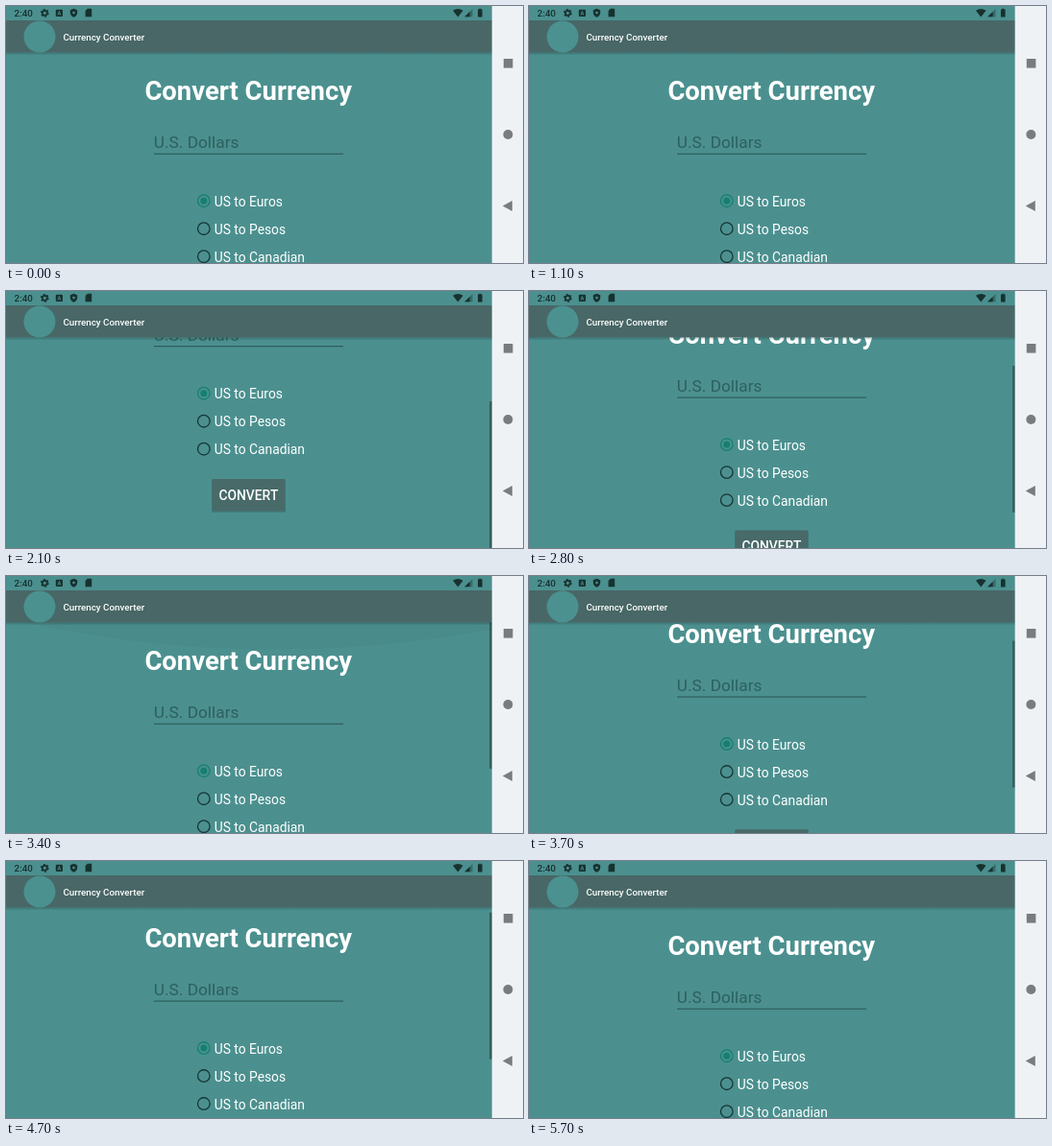
An HTML page for the animation above (5.9 s loop, 538 by 268 pixels).

```html
<!DOCTYPE html>
<html lang="en">
<head>
<meta charset="utf-8">
<title>Currency Converter</title>
<style>
  html, body { margin: 0; width: 100%; height: 100%; overflow: hidden; background: #4b908f; }
  svg { display: block; width: 538px; height: 268px; }
  text { font-family: Roboto, "Liberation Sans", sans-serif; fill: #fff; }
  .ink { fill: #17312f; }
  .heading { font-size: 27.45px; font-weight: 700; }
  .option { font-size: 13.8px; }
  .hint { font-size: 17.3px; fill: #2d605f; }
  .button { font-size: 13.8px; font-weight: 500; text-anchor: middle; }
  .bar { font-size: 9.8px; font-weight: 500; }
  .ring { fill: none; stroke: #183636; stroke-width: 1.3; }
  .on .ring { stroke: #14806f; }
  .dot { fill: #14806f; }
  .glow { fill: #405f60; opacity: .1; }
  .nav { fill: #787c7f; }
</style>
</head>
<body>
<svg viewBox="0 0 538 268" xmlns="http://www.w3.org/2000/svg">
  <defs>
    <clipPath id="view"><rect y="48" width="506" height="220"/></clipPath>
    <linearGradient id="shade" x2="0" y2="1">
      <stop stop-color="#000" stop-opacity=".2"/>
      <stop offset="1" stop-color="#000" stop-opacity="0"/>
    </linearGradient>
  </defs>
  <rect width="506" height="268" fill="#4b908f"/>

  <g clip-path="url(#view)">
    <g id="page">
      <text class="heading" x="144.4" y="98.3">Convert Currency</text>
      <text class="hint" x="153.8" y="148.2">U.S. Dollars</text>
      <rect x="154" y="153.7" width="197" height="1" fill="#285352"/>
      <g id="options"></g>
      <rect x="214" y="293" width="77" height="34.5" rx="1.5" fill="#000" opacity=".13"/>
      <rect x="214.5" y="292.5" width="76" height="33.5" rx="1" fill="#486a69"/>
      <text class="button" x="252.4" y="314.5">CONVERT</text>
    </g>
    <circle id="topGlow" class="glow" cx="280" r="1210"/>
    <circle id="endGlow" class="glow" cx="290" r="1210"/>
    <rect id="thumb" x="503" width="3" height="153" fill="#000"/>
  </g>

  <rect y="48.5" width="506" height="3" fill="url(#shade)"/>
  <rect y="15" width="506" height="33.5" fill="#486766"/>
  <circle cx="35" cy="32" r="16.5" fill="#4b9190"/>
  <text class="bar" x="59.4" y="35.8">Currency Converter</text>

  <g class="ink">
    <text class="bar ink" x="8.6" y="10.8">2:40</text>
    <circle cx="40.3" cy="7.3" r="2.5" fill="none" stroke="#17312f" stroke-width="1.8"/>
    <circle cx="40.3" cy="7.3" r="3.8" fill="none" stroke="#17312f" stroke-width="1.2" stroke-dasharray="2 1.98"/>
    <rect x="51.8" y="3.8" width="7.2" height="7.2" rx="1"/>
    <path d="M54 9.5 L55.4 5.4 L56.8 9.5 M54.5 8.2 H56.3" fill="none" stroke="#4b908f" stroke-width=".8"/>
    <path d="M70.5 2.8 L74.2 4.3 V7 Q74 10.3 70.5 11.8 Q67 10.3 66.8 7 V4.3 Z"/>
    <circle cx="70.5" cy="7" r="1.3" fill="#4b908f"/>
    <path d="M84.8 2.8 H89.2 V11.3 H82.6 V5 Z"/>
    <path d="M465 4.8 Q470.3 1.2 475.6 4.8 L470.3 11.5 Z"/>
    <path d="M485.5 3 V11.3 H477.2 Z" opacity=".4"/>
    <path d="M482.6 5.9 V11.3 H477.2 Z"/>
    <path d="M491 3.6 H492.3 V2.7 H494.3 V3.6 H495.6 V11.5 H491 Z"/>
  </g>

  <rect x="505.7" width="32.3" height="268" fill="#eef2f5"/>
  <rect class="nav" x="517.8" y="55" width="9.6" height="9.6"/>
  <circle class="nav" cx="522.4" cy="134" r="5"/>
  <path class="nav" d="M516.8 208.5 L526.8 203.1 V213.9 Z"/>
</svg>
<script>
  const LOOP = 5900, STEP = 100, DRAG = 560, MAX_SCROLL = 96.5, GLOW_RADIUS = 1210;
  const $ = id => document.getElementById(id);

  const ramp = (t, from, length) => Math.min(1, Math.max(0, (t - from) / length));
  const pulse = (t, from, length) => Math.sin(Math.PI * ramp(t, from, length));
  const drag = (t, from) => {
    const u = ramp(t, from, DRAG);
    return u * u * (3 - 2 * u);
  };

  // Two drags to the bottom, each followed by a drag back to the top.
  const scrolled = t => drag(t, 1540) - drag(t, 2500) + drag(t, 3500) - drag(t, 4240);

  $("options").innerHTML = ["Euros", "Pesos", "Canadian"].map((name, i) => {
    const y = 203.2 + 29 * i;
    return `<g class="${i ? "" : "on"}"><circle class="ring" cx="205.8" cy="${y}" r="6.3"/>` +
      (i ? "" : `<circle class="dot" cx="205.8" cy="${y}" r="3.5"/>`) +
      `<text class="option" x="216.8" y="${y + 5.6}">US to ${name}</text></g>`;
  }).join("");

  function setGlow(el, depth, edge, side) {
    el.setAttribute("cy", edge + side * (depth - GLOW_RADIUS));
    el.style.display = depth > 0.1 ? "" : "none";
  }

  function draw(t) {
    const s = scrolled(t);
    $("page").setAttribute("transform", `translate(0 ${-MAX_SCROLL * s})`);
    $("thumb").setAttribute("y", 48 + 67 * s);
    $("thumb").setAttribute("opacity", .33 * (ramp(t, 1400, 100) - ramp(t, 5500, 200)));
    setGlow($("topGlow"), 32 * pulse(t, 2950, 700) + 26 * pulse(t, 4750, 700), 48, 1);
    setGlow($("endGlow"), 24 * pulse(t, 3950, 480), 268, -1);
  }

  const start = performance.now();
  function tick() {
    const t = (performance.now() - start) % LOOP;
    draw(Math.floor(t / STEP) * STEP);
    requestAnimationFrame(tick);
  }
  tick();
</script>
</body>
</html>
```
